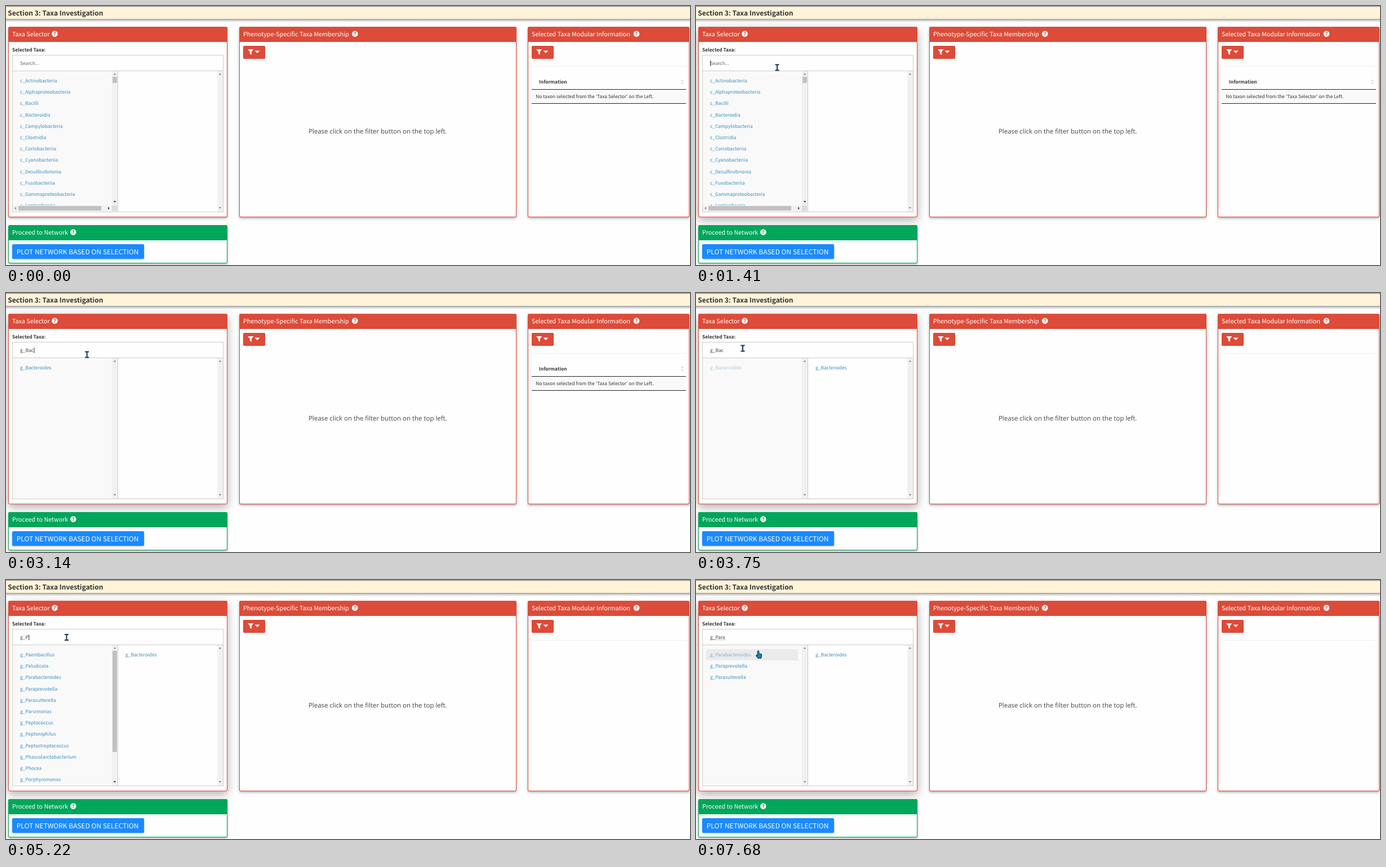
Animation, 1214 px wide and 461 px high, one loop 8000 ms. Source, as an HTML page with a canvas:

```html
<!DOCTYPE html>
<html lang="en">
<head>
<meta charset="utf-8">
<title>Taxa Investigation</title>
<style>
html, body { margin: 0; width: 100%; height: 100%; overflow: hidden; background: #fefefe; }
canvas { display: block; }
</style>
</head>
<body>
<canvas id="stage" width="1214" height="461"></canvas>
<script>
const ctx = document.getElementById('stage').getContext('2d');
const LOOP = 8000;
const SANS = '"Noto Sans CJK SC", "Noto Sans CJK JP", "Noto Sans CJK TC", "Noto Sans CJK KR", "Noto Sans CJK", "Open Sans", sans-serif';
const RED = '#dd4b39', GREEN = '#00a65a', LINK = '#3c8dbc';
const BODY = 8.4, HEAD = 10.75, LARGE = 12;
const ROW_TOP = 122.9, ROW_H = 20.2;

const named = (prefix, names) => names.split(' ').map(n => prefix + n);
const taxa = [
  ...named('c_', 'Actinobacteria Alphaproteobacteria Bacilli Bacteroidia Campylobacteria Clostridia Coriobacteriia Cyanobacteriia Desulfovibrionia Fusobacteriia Gammaproteobacteria Lentisphaeria Negativicutes'),
  ...named('g_[Clostridium]_', 'innocuum_group methylpentosum_group'),
  ...named('g_[Eubacterium]_', 'brachy_group coprostanoligenes_group eligens_group fissicatena_group hallii_group nodatum_group ruminantium_group siraeum_group ventriosum_group xylanophilum_group'),
  ...named('g_', 'Bacteroides Barnesiella Bifidobacterium Bilophila Blautia Brevundimonas Butyricicoccus Butyricimonas'),
  ...named('g_', 'Paenibacillus Paludicola Parabacteroides Paraprevotella Parasutterella Parvimonas Peptococcus Peptoniphilus Peptostreptococcus Phascolarctobacterium Phocea Porphyromonas Prevotella Pseudomonas')
];
const CHOSEN = 'g_Bacteroides', CHOSEN_AT = 3480;

const typing = [
  [0, ''], [1810, 'g'], [2080, 'g_'], [2340, 'g_B'], [2540, 'g_Ba'], [2740, 'g_Bac'],
  [4630, 'g_Ba'], [4760, 'g_B'], [4890, 'g_'], [5090, 'g_P'],
  [5620, 'g_Pa'], [5890, 'g_Par'], [6020, 'g_Para']
];
// time, x, y of the pointer's hot spot
const pointer = [
  [70, 150, 475], [730, 111.5, 169], [870, 118, 120], [940, 123, 113], [1410, 144, 109.5],
  [3140, 144, 109.5], [3340, 86, 129], [3540, 84, 129], [3750, 83, 98.5],
  [4020, 83, 98.5], [4230, 107.5, 102], [6350, 107.5, 102], [6620, 106.5, 119.5],
  [6950, 107, 124.5], [7140, 108, 127], [7540, 108, 127], [7680, 110.5, 126.5]
];

const latest = (list, t) => list.filter(k => k[0] <= t).pop();
const clamp = v => Math.max(0, Math.min(1, v));

function pointerAt(t) {
  const a = latest(pointer, t);
  if (!a) return null;
  const b = pointer[pointer.indexOf(a) + 1] || a;
  const p = a === b ? 0 : (t - a[0]) / (b[0] - a[0]);
  return { x: a[1] + (b[1] - a[1]) * p, y: a[2] + (b[2] - a[2]) * p };
}

function rect(x, y, w, h, color) {
  ctx.fillStyle = color;
  ctx.fillRect(x, y, w, h);
}
function round(x, y, w, h, r, color) {
  ctx.fillStyle = color;
  ctx.beginPath();
  ctx.roundRect(x, y, w, h, r);
  ctx.fill();
}
function poly(points, color) {
  ctx.fillStyle = color;
  ctx.beginPath();
  points.forEach(([x, y]) => ctx.lineTo(x, y));
  ctx.closePath();
  ctx.fill();
}
function text(str, x, y, size, color, weight = 400, family = SANS) {
  ctx.font = `${weight} ${size}px ${family}`;
  ctx.fillStyle = color;
  ctx.fillText(str, x, y);
  return ctx.measureText(str).width;
}
function shadow(dy, blur, alpha) {
  ctx.shadowColor = `rgba(0,0,0,${alpha})`;
  ctx.shadowOffsetY = dy;
  ctx.shadowBlur = blur;
}
function noShadow() { ctx.shadowColor = 'transparent'; }

function triangle(x, y, dx, dy, color, s = 2) {
  poly([[x + dx * s, y + dy * s],
        [x - dx * s * .5 + dy * s * 1.2, y - dy * s * .5 + dx * s * 1.2],
        [x - dx * s * .5 - dy * s * 1.2, y - dy * s * .5 - dx * s * 1.2]], color);
}

function panel(x, y, w, h, color, title, iconX, lift = 0) {
  shadow(2 + 3 * lift, 4 + 12 * lift, .32);
  round(x, y, w, h, 3, color);
  noShadow();
  round(x + 1, y + 1, w - 2, h - 2, 2, '#fefefe');
  round(x, y, w, 27, [3, 3, 0, 0], color);
  text(title, x + 7, y + 16.7, HEAD, '#fff');
  ctx.fillStyle = '#fff';
  ctx.beginPath();
  ctx.arc(iconX, y + 12.6, 5.3, 0, 7);
  ctx.fill();
  ctx.textAlign = 'center';
  text('?', iconX, y + 15.9, 9, color, 700);
  ctx.textAlign = 'left';
}

function filterButton(x) {
  round(x, 71, 39, 23, 2, '#d73925');
  round(x + .7, 71.7, 37.6, 21.6, 1.5, RED);
  poly([[x + 8, 77], [x + 18.5, 77], [x + 14.8, 81.6], [x + 14.8, 87], [x + 11.8, 85], [x + 11.8, 81.6]], '#fff');
  poly([[x + 20.5, 79.5], [x + 29.5, 79.5], [x + 25, 84]], '#fff');
}

function banner() {
  rect(0, 0, 1214, 24, '#fff3d9');
  rect(0, 0, 1214, 1.4, '#9a9a9a');
  const fade = ctx.createLinearGradient(0, 23, 0, 29);
  fade.addColorStop(0, '#8f8f8f');
  fade.addColorStop(.3, '#c4c4c4');
  fade.addColorStop(1, '#fefefe');
  rect(0, 23, 1214, 6, fade);
  text('Section 3: Taxa Investigation', 3.3, 17.2, 12.05, '#333', 700);
}

function verticalBar(x, bottom, thumb) {
  rect(x, 116, 10, bottom - 116, '#f1f1f1');
  triangle(x + 5, 121.5, 0, -1, '#8a8a8a');
  triangle(x + 5, bottom - 7, 0, 1, thumb ? '#404040' : '#8a8a8a');
  if (thumb) rect(x + 1, 126, 8, thumb, '#c1c1c1');
}

function selector(t, cursor) {
  const query = latest(typing, t)[1];
  const matches = taxa.filter(n => n.toLowerCase().includes(query.toLowerCase()));
  const wide = query.length < 3;
  const bottom = wide ? 355 : 366;
  const thumb = matches.length > 12 ? (query === '' ? 11 : wide ? 15 : 180) : 0;
  const chosen = t >= CHOSEN_AT;

  text('Selected Taxa:', 11, 80.8, BODY, '#333', 700);
  rect(11, 87, 375, 280, '#ccc');
  rect(12, 88, 373, 278, '#fefefe');
  rect(12, 116, 186, 250, '#f9f9f9');
  rect(12, 115, 373, 1, '#ccc');
  rect(198, 116, 1, 250, '#ccc');

  const typed = text(query || 'Search...', 25, 104.8, BODY, query ? '#444' : '#666');
  if (t >= 6950) {
    for (let x = 25; x < 25 + typed; x += 2) rect(x, 106.3, 1, .8, '#a66');
  }
  drawCaret(t, query ? 25.5 + typed : 25);

  ctx.save();
  ctx.beginPath();
  ctx.rect(12, 116, 176, bottom - 116);
  ctx.clip();
  const inList = cursor && cursor.x > 18 && cursor.x < 181 && cursor.y < bottom;
  const over = inList ? Math.floor((cursor.y - ROW_TOP) / ROW_H) : -1;
  matches.slice(0, 12).forEach((name, i) => {
    const faded = chosen && name === CHOSEN;
    const hovered = i === over && !faded;
    if (hovered) rect(18, ROW_TOP + i * ROW_H, 163, ROW_H, '#ebebeb');
    ctx.globalAlpha = faded ? .42 : hovered ? .6 : 1;
    text(name, 25, 136 + i * ROW_H, BODY, LINK);
    ctx.globalAlpha = 1;
  });
  ctx.restore();

  verticalBar(188, bottom, thumb);
  if (wide) {
    rect(12, 355, 176, 10, '#f1f1f1');
    rect(188, 355, 9, 10, '#dcdcdc');
    rect(22, 356, 147, 8, '#c1c1c1');
    triangle(17, 360, -1, 0, '#8a8a8a');
    triangle(182, 360, 1, 0, '#404040');
  }
  verticalBar(375, 366, 0);
  if (chosen) text(CHOSEN, 212, 136, BODY, LINK);
  return over >= 0 && over < matches.length;
}

function drawCaret(t, x) {
  const focused = t >= 1300 && t < 3450 || t >= 4100;
  const since = Math.max(latest(typing, t)[0], t >= 4100 ? 4100 : 1300);
  if (focused && Math.floor((t - since) / 510) % 2 === 0) rect(x, 97, 1, 10, '#333');
}

function information(t) {
  rect(933, 107, 274, 1, '#f1f1f1');
  if (t >= CHOSEN_AT) return;
  text('Information', 946, 138, BODY, '#333', 700);
  triangle(1200.5, 132.6, 0, -1, '#d2d2d2');
  triangle(1200.5, 137.4, 0, 1, '#d2d2d2');
  rect(933, 149, 274, 24, '#f9f9f9');
  rect(933, 148, 274, 1, '#222');
  rect(933, 173, 274, 1, '#222');
  text("No taxon selected from the 'Taxa Selector' on the Left.", 940.3, 164, BODY, '#333');
}

function outline(points) {
  poly(points, '#1584b4');
  ctx.strokeStyle = '#12303f';
  ctx.lineWidth = 1.1;
  ctx.lineJoin = 'round';
  ctx.stroke();
}

function drawPointer({ x, y }, overItem) {
  ctx.save();
  ctx.translate(x, y);
  const inSearch = x > 11 && x < 385 && y > 87 && y < 116;
  const overButton = x > 11 && x < 245 && y > 423 && y < 450;
  if (inSearch) {
    rect(-1, -5, 2, 10, '#14374a');
    rect(-3.5, -6, 7, 2, '#14374a');
    rect(-3.5, 4, 7, 2, '#14374a');
  } else if (overItem || overButton) {
    outline([[-1.2, .3], [0, -.4], [1.1, .3], [1.3, 4.3], [4.5, 5], [6, 6.2], [5.8, 10], [4.6, 13],
             [-.3, 13], [-3.6, 8.6], [-3.4, 7], [-2.2, 7], [-1.2, 8.2]]);
  } else {
    outline([[0, 0], [0, 10], [2.4, 8], [4.3, 11.8], [6, 11], [4.4, 7.3], [7.3, 7]]);
  }
  ctx.restore();
}

function draw(t) {
  const cursor = pointerAt(t);
  ctx.textRendering = 'geometricPrecision';
  rect(0, 0, 1214, 461, '#fefefe');
  banner();

  panel(4, 37, 389, 339, RED, 'Taxa Selector', 86.5, clamp((t - 250) / 300));
  panel(414, 37, 492, 339, RED, 'Phenotype-Specific Taxa Membership', 619.3);
  panel(926, 37, 287, 339, RED, 'Selected Taxa Modular Information', 1119);
  panel(4, 390, 389, 68, GREEN, 'Proceed to Network', 119.3);

  filterButton(421);
  filterButton(933);
  ctx.textAlign = 'center';
  text('Please click on the filter button on the top left.', 659.8, 227, 11.45, '#444', 400, '"Open Sans", sans-serif');
  ctx.textAlign = 'left';

  shadow(1, 3, .3);
  round(11, 424, 234, 26, 2, '#1a8aff');
  noShadow();
  text('PLOT NETWORK BASED ON SELECTION', 18.7, 441.5, LARGE, '#fff');

  information(t);
  const overItem = selector(t, cursor);
  if (cursor) drawPointer(cursor, overItem);
}

const start = performance.now();
function frame() {
  draw((performance.now() - start) % LOOP);
  requestAnimationFrame(frame);
}
frame();
</script>
</body>
</html>
```
